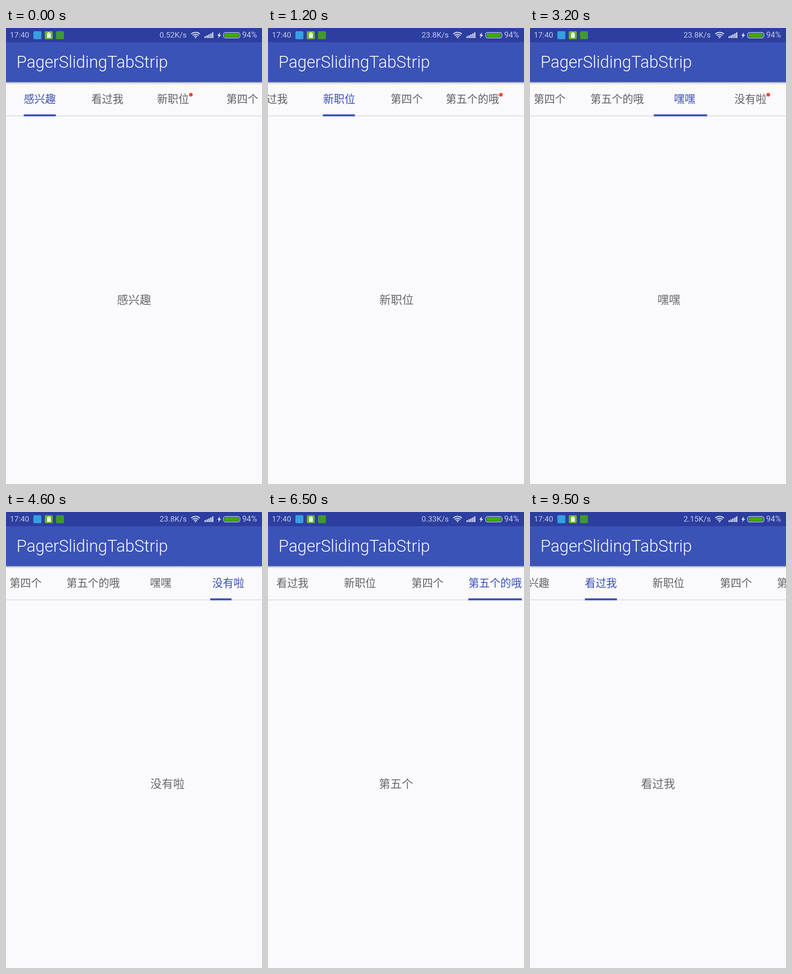
An HTML page for the animation above (9600 ms loop, 561 px wide and 998 px high).

```html
<!DOCTYPE html>
<html lang="zh-CN">
<head>
<meta charset="utf-8">
<title>PagerSlidingTabStrip</title>
<style>
  html, body { margin: 0; width: 100%; height: 100%; overflow: hidden; background: #faf9fc; }
  svg { display: block; width: 561px; height: 998px; }
  text { font-family: Roboto, "Noto Sans", sans-serif; }
  .tab, .page { font-family: "Noto Sans CJK SC", "Noto Sans CJK", sans-serif; text-anchor: middle; fill: #616163; }
  .tab { font-size: 23.4px; }
  .tab.on { fill: #3a50b3; }
  .page { font-size: 25px; fill: #69696b; }
  .status text { font-size: 17px; fill: #c5cbec; }
  .title { font-size: 36.3px; font-weight: 300; fill: #fafbff; }
</style>
</head>
<body>
<svg viewBox="0 0 561 998">
  <defs>
    <linearGradient id="shade" x1="0" y1="0" x2="0" y2="1">
      <stop offset="0" stop-opacity=".3"/>
      <stop offset=".45" stop-opacity=".12"/>
      <stop offset="1" stop-opacity="0"/>
    </linearGradient>
  </defs>
  <rect width="561" height="998" fill="#faf9fc"/>
  <g id="pages"></g>
  <rect y="191.5" width="561" height="1.8" fill="#dcdce1"/>
  <g id="strip">
    <rect id="bar" y="189" height="4.3" fill="#3b52b7"/>
  </g>
  <rect y="118" width="561" height="6" fill="url(#shade)"/>
  <rect width="561" height="118.5" fill="#3b52b7"/>
  <rect width="561" height="31" fill="#2c3e9f"/>
  <text class="title" x="23" y="87">PagerSlidingTabStrip</text>
  <g class="status">
    <text x="8.5" y="21">17:40</text>
    <rect x="60" y="7" width="17.5" height="17.5" rx="2.5" fill="#35a0e2"/>
    <rect x="85" y="7" width="17.5" height="17.5" rx="2.5" fill="#67b532"/>
    <path d="M90 11h2v-1.2h4V11h2v10.5h-8z" fill="#fff"/>
    <path d="M91.5 13h5" stroke="#67b532" stroke-width="1"/>
    <rect x="109.5" y="7" width="17.5" height="17.5" rx="2.5" fill="#40992f"/>
    <text id="speed" x="396" y="21" text-anchor="end"></text>
    <g fill="none" stroke="#e3e7f8" stroke-width="2">
      <path d="M406 13.3a13.5 13.5 0 0 1 19 0M409 16.3a9.3 9.3 0 0 1 13 0M412 19a5 5 0 0 1 7 0"/>
    </g>
    <circle cx="415.5" cy="21" r="1.5" fill="#e3e7f8"/>
    <path d="M436.5 22v-4M440.7 22v-6M444.8 22v-8M449 22v-10M453 22v-12.5" stroke="#e3e7f8" stroke-width="2.7"/>
    <path d="M469 9.5l-6 7.200h3.6l-2 5.8 7-7.5h-3.8z" fill="#e3e7f8"/>
    <rect x="476.7" y="9.7" width="36" height="12" rx="4.5" fill="none" stroke="#c5cbec" stroke-width="1.4"/>
    <rect x="479" y="11.5" width="31.5" height="8.5" rx="2.5" fill="#40aa0a"/>
    <text x="517.5" y="21" style="font-size:17.5px">94%</text>
  </g>
</svg>
<script>
const LOOP = 9600, STEP = 100, WIDTH = 561, TAB = 148, CHAR = 23.4;
const MAX_SCROLL = TAB * 7 - WIDTH, ANCHOR = 120.3, LAG = 15;
const tabNames = ['感兴趣', '看过我', '新职位', '第四个', '第五个的哦', '嘿嘿', '没有啦'];
const pageNames = tabNames.map((name, i) => i === 4 ? '第五个' : name);
const speeds = [[0, '0.52K/s'], [800, '23.8K/s'], [4800, '0.33K/s'], [8800, '2.15K/s']];

// A finger drags for a while, then the pager settles by itself.
const swipe = (at, from, to, drag = 100, pull = 0.22) => ({ at, from, to, drag, pull, settle: 350 });
const moves = [
  swipe(465, 0, 1), swipe(855, 1, 2), swipe(1455, 2, 3), swipe(2047, 3, 4),
  swipe(2946, 4, 5), swipe(3855, 5, 6), swipe(4422, 6, 5, 270, 0.3), swipe(5151, 5, 4),
  { at: 7380, from: 4, to: 1, drag: 0, pull: 0, settle: 400 }
];
const handScroll = { at: 6150, end: 6735, until: 7380 };

const $ = id => document.getElementById(id);
const clamp = (v, lo, hi) => Math.min(hi, Math.max(lo, v));

function add(parent, tag, attrs, label = '') {
  const el = document.createElementNS('http://www.w3.org/2000/svg', tag);
  for (const key in attrs) el.setAttribute(key, attrs[key]);
  el.textContent = label;
  return parent.appendChild(el);
}

const tabs = tabNames.map((name, i) => {
  const mid = TAB * (i + 0.5), half = name.length * CHAR / 2;
  const hasDot = i > 0 && i % 2 === 0;
  return {
    mid, half, hasDot,
    label: add($('strip'), 'text', { class: 'tab', y: 163.7 }, name),
    dot: hasDot && add($('strip'), 'circle', { cx: mid + half, cy: 146, r: 4, fill: '#fb432c' }),
    seenAt: (m => m ? m.at + m.drag : 0)(moves.find(m => m.to === i))
  };
});
const pages = pageNames.map(name => add($('pages'), 'text', { class: 'page', y: 604 }, name));

function position(t) {
  const m = moves.filter(m => m.at <= t).pop();
  if (!m) return 0;
  const past = t - m.at;
  const done = past < m.drag
    ? m.pull * (past / m.drag) ** 2
    : 1 - (1 - m.pull) * (1 - Math.min(1, (past - m.drag) / m.settle)) ** 5;
  return m.from + (m.to - m.from) * done;
}

function selected(t) {
  const m = moves.filter(m => m.at + m.drag <= t).pop();
  return m ? m.to : 0;
}

function scrollAt(t, barLeft) {
  if (t >= handScroll.at && t < handScroll.until) {
    const x = clamp((t - handScroll.at) / (handScroll.end - handScroll.at), 0, 1);
    return MAX_SCROLL * (1 - x * x * (3 - 2 * x));
  }
  return clamp(barLeft - ANCHOR, 0, MAX_SCROLL);
}

function draw(t) {
  const p = position(t), trail = position(t - LAG), current = selected(t);
  pages.forEach((page, i) => page.setAttribute('x', WIDTH * (i - p + 0.5)));

  // The bar keeps the label width of the tab it is leaving.
  const tab = tabs[Math.floor(trail)];
  const left = tab.mid - tab.half + TAB * (trail % 1);
  $('bar').setAttribute('x', left);
  $('bar').setAttribute('width', tab.half * 2);
  $('strip').setAttribute('transform', `translate(${-scrollAt(t, left)} 0)`);

  tabs.forEach((tab, i) => {
    const unseen = tab.hasDot && t < tab.seenAt;
    tab.label.setAttribute('x', tab.mid - (unseen ? 4 : 0));
    tab.label.classList.toggle('on', i === current);
    if (tab.dot) tab.dot.setAttribute('visibility', unseen ? 'visible' : 'hidden');
  });
  $('speed').textContent = speeds.filter(s => s[0] <= t).pop()[1];
}

const start = performance.now();
function tick() {
  const t = (performance.now() - start) % LOOP;
  draw(Math.floor(t / STEP) * STEP);
  requestAnimationFrame(tick);
}
tick();
</script>
</body>
</html>
```
